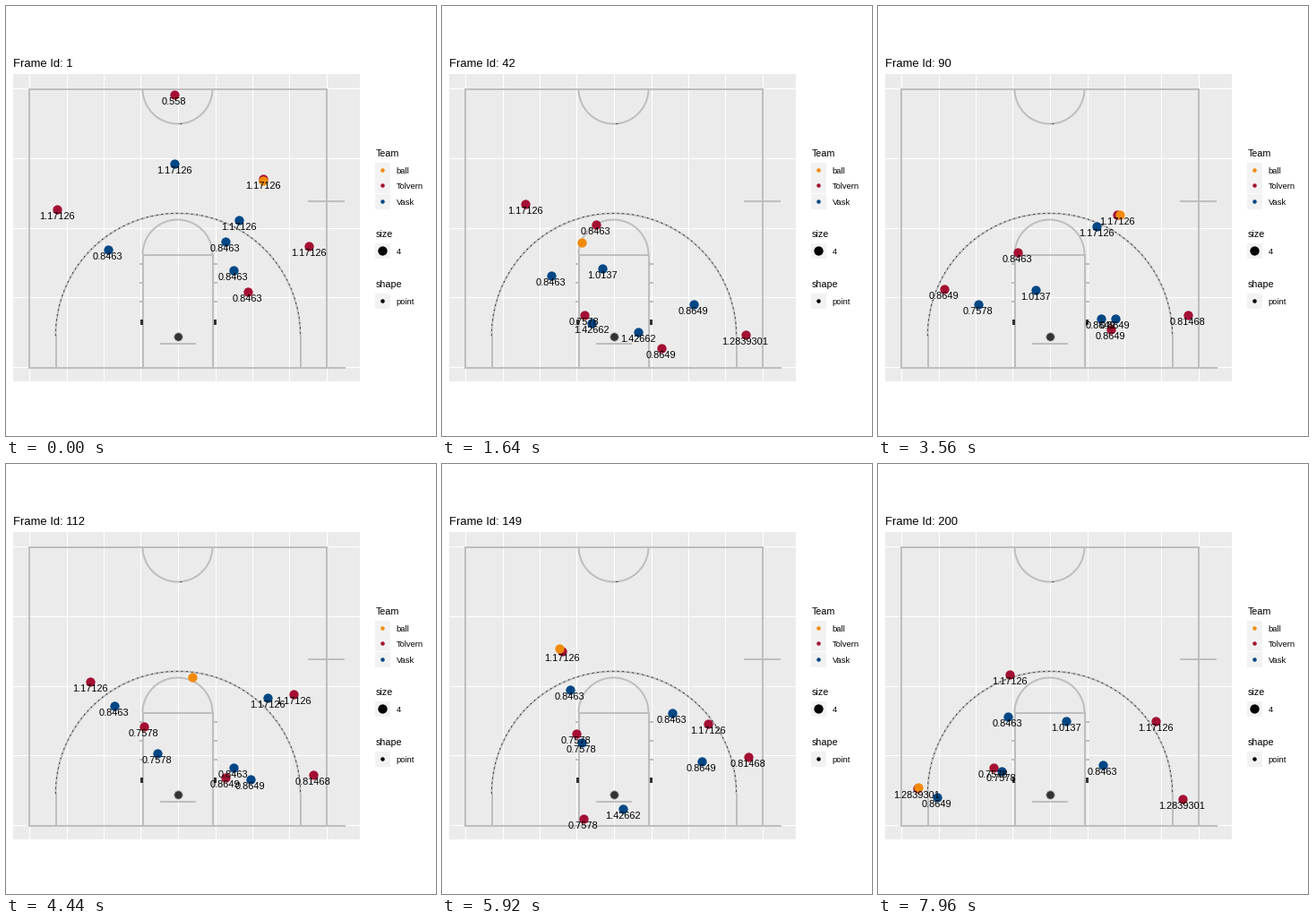
Animation, 480 px wide and 480 px high, one loop 8000 ms. Source, as a matplotlib script:

```python
import numpy as np
import matplotlib.pyplot as plt
from matplotlib.animation import FuncAnimation
from matplotlib.patches import Rectangle

FRAMES, INTERVAL = 200, 40
PX = 0.9  # points per pixel at 80 dpi
ORANGE, RED, BLUE = "#F28A0A", "#A41034", "#004785"
GREY, DARK = "#BEBEBE", "#333333"
HOOP = 192 + 369j  # court places are x + y*j, in pixels
BEATS = [0, 41, 67, 111, 148, 178, 199]
GAP_BEATS = [0, 41, 67, 148, 178]

plt.rcParams["font.family"] = "Liberation Sans"
fig = plt.figure(figsize=(6, 6), dpi=80, facecolor="white")
ax = fig.add_axes([0, 0, 1, 1])
ax.set_xlim(0.5, 480.5)
ax.set_ylim(480.5, 0.5)
ax.axis("off")


def box(x, y, w, h, color, z=1):
    ax.add_patch(Rectangle((x + 0.5, y + 0.5), w, h, fc=color, lw=0, zorder=z))


def line(xs, ys, color=GREY, width=2, smooth=False, **kw):
    ax.plot(xs, ys, color=color, lw=width * PX, antialiased=smooth,
            solid_capstyle="butt", zorder=2, **kw)


def arc(cx, cy, r, start, stop, **kw):
    a = np.radians(np.linspace(start, stop, 181))
    line(cx + r * np.cos(a), cy + r * np.sin(a), smooth=True, **kw)


def dot(x, y, size, color, z=3, edge="none"):
    return ax.plot([x], [y], "o", ms=size * PX, mfc=color, mec=edge,
                   mew=0.8, zorder=z)[0]


def text(x, y, s, size, **kw):
    return ax.text(x, y, s, fontsize=size * PX, color="black",
                   va="baseline", zorder=9, **kw)


def draw_court():
    box(8, 76, 387, 343, "#EBEBEB")
    for x in np.round(26 + 41.5 * np.arange(9)):
        line([x, x], [76.5, 419.5], "white", 1)
    for y in np.round(92 + 77.75 * np.arange(5)):
        line([8.5, 395.5], [y, y], "white", 1)

    line([26, 26, 358, 358], [404, 93, 93, 404])
    line([25, 379], [404, 404])
    line([337, 378], [218, 218])
    line([153, 153, 231, 231], [404, 278, 278, 404])
    line([172, 212], [377, 377])
    for x in (56, 329):
        line([x, x], [404, 368])
    arc(192.5, 368.5, 136.5, 180, 360)
    arc(192, 278, 39, 180, 360)
    arc(192, 93, 39, 0, 180)
    speck = dict(color="black", width=0.8)
    arc(192.5, 368.5, 136.7, 180, 360, ls=(0, (2, 5)), **speck)
    arc(192, 93, 39.3, 83, 88, ls=(0, (2, 2)), **speck)

    for x in (149, 232):
        for y in (288, 309, 330):
            line([x, x + 4], [y, y])
    box(150, 350, 3, 6, DARK, 3)
    box(232, 350, 3, 6, DARK, 3)
    dot(HOOP.real, HOOP.imag, 9.6, DARK, edge=GREY)


def draw_legend():
    groups = [
        ("Team", 169, [("ball", ORANGE, 4.5), ("Tolvern", RED, 4.5),
                       ("Vask", BLUE, 4.5)]),
        ("size", 259, [("4", "black", 10.3)]),
        ("shape", 315, [("point", "black", 4.5)]),
    ]
    for title, y, rows in groups:
        text(413, y, title, 10.8)
        for i, (name, color, size) in enumerate(rows):
            top = round(y + 6 + 17.3 * i)
            box(412, top, 17, 17.3, "#F2F2F2")
            dot(420, top + 8, size, color)
            text(436, top + 12.5, name, 9.4)


def glide(stops):
    """Smooth path that passes each stop on its beat."""
    t, p = np.array(BEATS), np.array(stops)
    v = np.gradient(p, t)
    now = np.arange(FRAMES)
    k = np.clip(np.searchsorted(t, now, "right") - 1, 0, len(t) - 2)
    h = t[k + 1] - t[k]
    u = (now - t[k]) / h
    return ((1 + 2 * u) * (1 - u) ** 2 * p[k] + u * (1 - u) ** 2 * h * v[k]
            + u * u * (3 - 2 * u) * p[k + 1] + u * u * (u - 1) * h * v[k + 1])


def shadow(man, gaps):
    """Defender keeps a slowly changing gap to his man."""
    return man + np.interp(np.arange(FRAMES), GAP_BEATS, gaps)


def expected_points(spot):
    """Value of a shot, by zone around the hoop."""
    d = spot - HOOP
    dist = abs(d)
    angle = np.degrees(np.arctan2(-d.imag, abs(d.real)))
    if dist > 230:
        return 0.558
    if dist > 130:
        return 1.2839301 if angle < 3 else 0.81468 if angle < 34 else 1.17126
    if dist < 36:
        return 1.42662
    if dist < 85 and angle > 65:
        return 1.0137
    if dist < 90 and d.real < 0:
        return 0.7578
    return 0.8463 if angle > 25 else 0.8649


class Player:
    def __init__(self, color, path):
        self.path = path
        self.dot = dot(0, 0, 10.3, color, 4)
        self.label = text(0, 0, "", 11, ha="center")

    def show(self, i):
        spot = self.path[i]
        x, y = np.round([spot.real, spot.imag])
        self.dot.set_data([x], [y])
        self.label.set_text(f"{expected_points(spot):.8g}")
        self.label.set_position((x, y + 11.5))


trailer = glide([188+99j, 172+244j, 160+256j, 154+293j,
                 150+301j, 139+335j, 129+339j])
wing = glide([57+227j, 93+221j, 187+216j, 321+257j,
              297+290j, 335+318j, 310+287j])
guard = glide([287+193j, 159+345j, 82+373j, 94+243j,
               134+209j, 125+233j, 147+235j])
cutter = glide([270+319j, 245+382j, 258+379j, 245+350j,
                158+396j, 48+358j, 44+362j])
corner = glide([338+268j, 339+367j, 346+345j, 343+347j,
                342+327j, 330+373j, 340+374j])

defence = [
    shadow(trailer, [77j, 7+49j, 26+54j, 6+10j, 9+4j]),
    shadow(wing, [57+45j, 29+80j, -16+23j, -40-12j, -100+0j]),
    shadow(guard, [-27+46j, 8+9j, 48+7j, 9+43j, -2+47j]),
    shadow(cutter, [-16-24j, -26-18j, -32-12j, 44-11j, 22+10j]),
    shadow(corner, [-93-5j, -58-34j, -91+4j, -52+5j, -89-38j]),
]


def ball_path():
    """Ball follows its holder and flies straight in passes."""
    now = np.arange(FRAMES)
    path = guard
    for start, stop, catcher in [(12, 22, trailer), (46, 56, wing),
                                 (105, 117, guard), (158, 170, cutter)]:
        u = np.clip((now - start) / (stop - start), 0, 1)
        path = path * (1 - u) + catcher * u
    # Reach from the holder's body while dribbling
    reach = np.array([2j, -16+20j, 5+13j, -12j, -3-3j, 2-4j, 1-1j])
    return path + np.interp(now, BEATS, reach)


draw_court()
draw_legend()
players = ([Player(RED, p) for p in (trailer, wing, guard, cutter, corner)]
           + [Player(BLUE, p) for p in defence])
ball_at = ball_path()
ball = dot(0, 0, 10.3, ORANGE, 5)
title = text(9, 69, "", 13)


def update(i):
    title.set_text(f"Frame Id: {i + 1}")
    for p in players:
        p.show(i)
    ball.set_data([round(ball_at[i].real)], [round(ball_at[i].imag)])
    return []


anim = FuncAnimation(fig, update, frames=FRAMES, interval=INTERVAL,
                     repeat=True, repeat_delay=0, blit=False)
plt.show()
```
